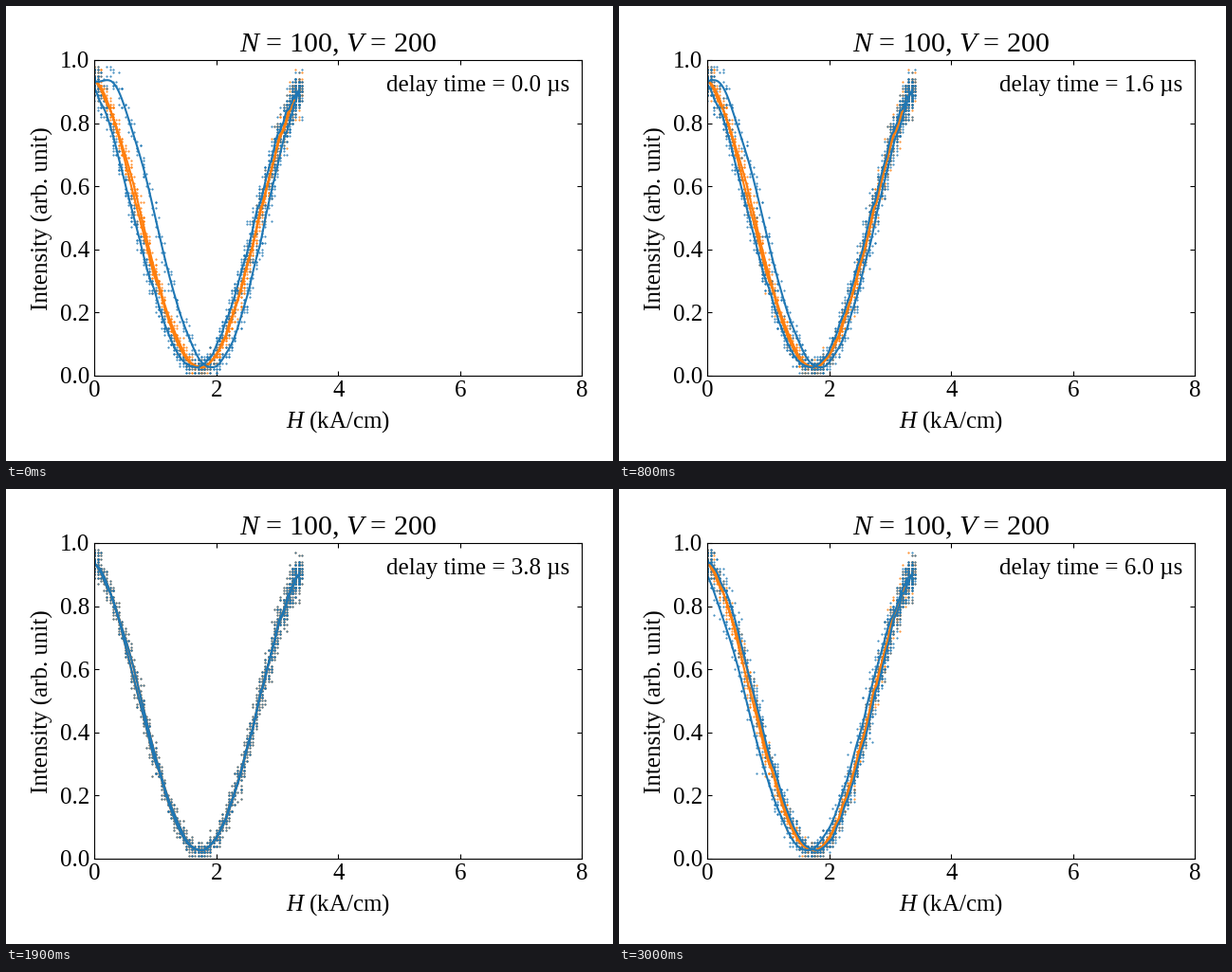
A matplotlib script that plays this animation: 640x480 px, repeating every 3.1 s.

```python
import numpy as np
import matplotlib.pyplot as plt
from matplotlib.animation import FuncAnimation

plt.rcParams.update({
    "font.family": "Liberation Serif",
    "font.size": 18,
    "mathtext.fontset": "custom",
    "mathtext.rm": "Liberation Serif",
    "mathtext.it": "Liberation Serif:italic",
    "xtick.direction": "in",
    "ytick.direction": "in",
    "xtick.top": True,
    "ytick.right": True,
})

W, H = 640, 480
BLUE, ORANGE = "tab:blue", "tab:orange"
STEPS = 31
DT = 0.2                  # sampling step and delay step, in microseconds
MATCH = 19                # step at which field and signal are in phase
PEAK = 3.36               # kA/cm
DARK = 1.73               # field of the darkest point
POWER, START_RATE = 2.2, 0.07
RISE = PEAK * POWER / START_RATE
FALL = 220.0
PAD = 60                  # idle samples on both sides of the pulse
rng = np.random.default_rng(7)


def field(t):
    """Current pulse: quick rise, slower sinusoidal fall."""
    up = PEAK * (1 - (1 - np.clip(t / RISE, 0, 1)) ** POWER)
    down = PEAK * np.cos(np.pi / 2 * np.clip((t - RISE) / FALL, 0, 1))
    return np.where(t < RISE, up, down)


def intensity(t):
    """Squared cosine of a rotation angle, with a slight gap between branches."""
    h = field(t)
    gap = np.where(t < RISE, -1, 1) * 0.014 * (1 - h / PEAK)
    h = np.maximum(h + gap, 0)
    angle = np.pi / 2 * (h / DARK) ** (0.84 + 0.035 * h)
    return 0.024 + 0.906 * np.cos(angle) ** 2 + 0.012 * np.exp(-h / 0.05)


def smooth(y, sigma):
    k = np.arange(-4 * sigma, 4 * sigma + 1)
    w = np.exp(-0.5 * (k / sigma) ** 2)
    return np.convolve(np.pad(y, 4 * sigma, mode="edge"), w / w.sum(), "valid")


time = (np.arange(int((RISE + FALL) / DT) + 2 * PAD) - PAD) * DT
clean_h, clean_i = field(time), intensity(time)

# Measured samples, rounded to the resolution of the recorder
spread = 0.01 + 0.012 * clean_i + 0.045 * clean_i * (1 - clean_i)
dots_x = np.abs(clean_h + rng.normal(0, 0.022, time.size))
dots_x = np.minimum(np.round(dots_x / 0.05) * 0.05, 3.4)
dots_y = np.round(clean_i + rng.normal(0, 1, time.size) * spread, 2)
dots_y = np.clip(dots_y, 0.01, 0.98)
line_y = smooth(dots_y, 8)
used = np.arange(20, time.size - 20)

fig = plt.figure(figsize=(W / 100, H / 100), dpi=100, facecolor="white")
ax = fig.add_axes([0.146, 0.1875, 0.803, 0.694])
ax.set_xlim(0, 8)
ax.set_ylim(0, 1)
ax.set_xticks(range(0, 9, 2))
ax.set_title("$N$ = 100, $V$ = 200")


def label(x, y, s, **kw):
    return fig.text(x / W, 1 - y / H, s, va="baseline", **kw)


label(350, 445, "$H$ (kA/cm)", ha="center")
label(45, 224, "Intensity (arb. unit)", ha="center", rotation=90,
      rotation_mode="anchor")
caption = label(401, 90, "", ha="left")


def dots(x, y, color, z):
    return ax.plot(x, y, ".", ms=1, color=color, zorder=z)[0]


def curve(x, y, color, z):
    return ax.plot(x, y, color=color, lw=1.5, zorder=z)[0]


dots(dots_x[used], dots_y[used], ORANGE, 2)
blue_dots = dots([], [], BLUE, 2.1)
curve(clean_h[used], line_y[used], ORANGE, 2.2)
blue_line = curve([], [], BLUE, 2.3)


def draw(step):
    moved = used + MATCH - step
    blue_dots.set_data(dots_x[moved], dots_y[used])
    blue_line.set_data(clean_h[moved], line_y[used])
    caption.set_text(f"delay time = {step * DT:.1f} µs")
    return blue_dots, blue_line, caption


anim = FuncAnimation(fig, draw, frames=STEPS, interval=100, repeat=True)
plt.show()
```
